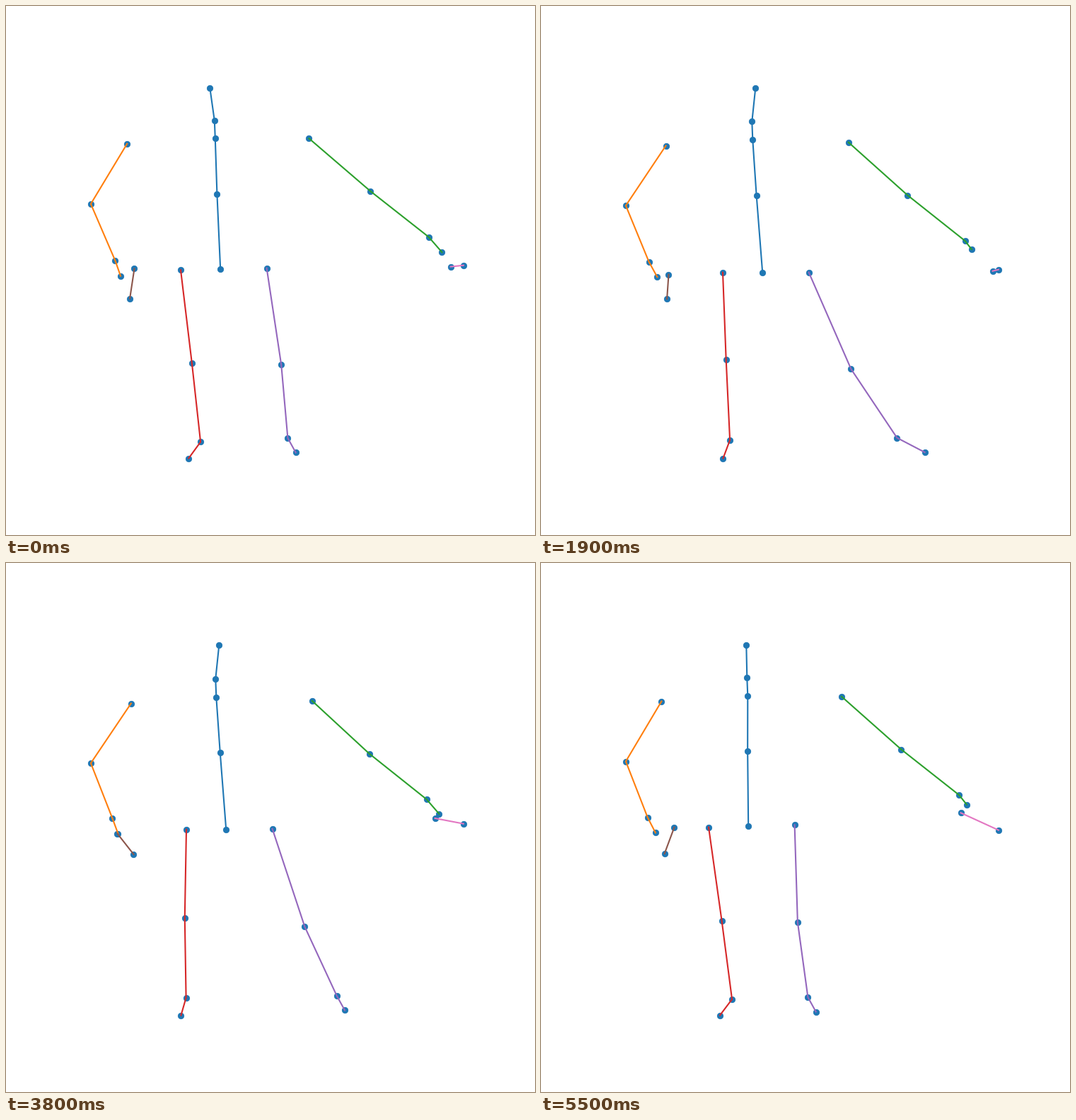
These frames come from a looping animation (748 by 748 pixels, 5.6 s). A matplotlib script:

```python
import numpy as np
import matplotlib.pyplot as plt
from matplotlib.animation import FuncAnimation

SIZE, DPI = 748, 100
FRAMES, STEP = 56, 100

# Body motions at a few key times; every joint follows a mix of them.
TIMES = np.array([0, 13, 19, 27, 38, 48, 55])
MOTIONS = dict(
    sag=[0, 4.5, 5.5, 6.5, 7.5, 6.5, 1.5],     # shoulders drop
    sway=[0, 1, 10, 8, 8, -5, -10],            # hips move sideways
    shift=[0, 0, 3.5, -0.5, 1.5, 2.5, -3.5],   # chest moves sideways
    nod=[0, 11, 11.5, 10.5, 11.5, 13.5, 5.5],  # head tilts
    stride=[0, 0.78, 1, 0.93, 0.66, -0.2, -0.2],
    drift=[0, -7, -8, -17, -20.5, -14, -5],    # left foot slides
    curl=[0, 0, -9.5, -11, -1, -11, -8],       # right wrist bends
    reach=[0, 8, 10, -44, -22, -24, -35],      # right finger
    flick=[0, -4, -1, -25, -24, -45, 7],       # left finger
    tip=[0, 14, 6, 15, 2, 4, 11],
)
HEEL_LIFT, TOE_OUT = 0.68, 28


def joint(rest, **gains):
    """Rest place and gains are complex: x is real, y (down) imaginary."""
    return rest, gains


def arm_gains(shift, sag):
    return dict(shift=shift, sag=sag + 1j, sway=-0.15)


wrist = arm_gains(2, -0.65)
ankle = dict(stride=105, sag=0.4j, sway=-0.25j)
left_wrist = dict(sag=-0.8, sway=0.25, stride=1.5j)

LIMBS = [
    [  # spine
        joint(288.3 + 115.9j, shift=1, nod=1),
        joint(294.8 + 162j, shift=1, sag=0.25j),
        joint(295.8 + 187.3j, shift=1, sag=0.3j),
        joint(298.4 + 265.8j, shift=0.5, sway=0.45, sag=0.2j, stride=1j),
        joint(303.2 + 372.4j, sway=1, sag=0.33j, stride=2.5j),
    ],
    [  # left arm
        joint(171.2 + 194.8j, shift=0.5, sag=0.65 + 0.5j),
        joint(119.9 + 279.9j, sag=0.42j),
        joint(154.5 + 360.2j, **left_wrist),
        joint(162 + 381.7j, curl=-0.45, **left_wrist),
    ],
    [  # right arm
        joint(428.5 + 187.3j, **arm_gains(1.6, 0.4)),
        joint(515.5 + 262j, **arm_gains(2, -0.5)),
        joint(597.7 + 326.6j, **wrist),
        joint(616.4 + 348.1j, curl=1 + 1j, **wrist),
    ],
    [  # left leg
        joint(247 + 373.3j, sway=1, sag=0.35j, stride=1.5j),
        joint(262.9 + 505.2j, drift=0.65, sway=0.4, stride=-5j),
        joint(275.1 + 616.4j, drift=1, stride=-2.5j),
        joint(258.3 + 639.5j, drift=0.9, sag=0.8, sway=0.2),
    ],
    [  # right leg
        joint(368.6 + 370.6j, sway=1, sag=0.35j, stride=4j),
        joint(389.2 + 507j, stride=33 + 2j, sway=1.9, sag=-0.5 + 0.8j),
        joint(398.4 + 610.9j, **ankle),
        joint(409.7 + 631.4j, toes=TOE_OUT, **ankle),
    ],
    [  # left finger
        joint(181.5 + 371.4j, flick=1, sag=1.5j),
        joint(175.1 + 413.5j, sway=0.4, reach=-0.1 + 0.07j),
    ],
    [  # right finger
        joint(628.6 + 368.6j, reach=1 + 0.45j, sag=0.3j),
        joint(646.9 + 366.7j, tip=1j),
    ],
]


def ease(keys):
    """All frames of one motion, smooth and without overshoot."""
    keys = np.array(keys, float)
    gap = np.diff(TIMES)
    rate = np.diff(keys) / gap
    a, b = rate[:-1], rate[1:]
    same = a * b > 0
    inner = np.where(same, 2 * a * b / np.where(same, a + b, 1), 0)
    slope = np.concatenate([rate[:1], inner, rate[-1:]])

    frames = np.arange(FRAMES)
    k = np.searchsorted(TIMES[1:-1], frames, side="right")
    t = (frames - TIMES[k]) / gap[k]
    blend = t * t * (3 - 2 * t)
    bend = t * (1 - t) * gap[k] * ((1 - t) * slope[k] - t * slope[k + 1])
    return keys[k] * (1 - blend) + keys[k + 1] * blend + bend


motion = {name: ease(keys) for name, keys in MOTIONS.items()}
motion["toes"] = np.clip((motion["stride"] - HEEL_LIFT) * 10, 0, 1)


def place(limb, frame):
    z = np.array([rest + sum(g * motion[name][frame]
                             for name, g in gains.items())
                  for rest, gains in limb])
    return np.column_stack([z.real, z.imag])


fig = plt.figure(figsize=(SIZE / DPI, SIZE / DPI), dpi=DPI, facecolor="white")
ax = fig.add_axes([0, 0, 1, 1])
ax.set_xlim(0, SIZE)
ax.set_ylim(SIZE, 0)
ax.axis("off")

dots = ax.scatter([], [], s=36, color="C0", linewidths=0.6)
lines = [ax.plot([], [], color=f"C{i}", lw=1.5)[0] for i in range(len(LIMBS))]


def draw(frame):
    poses = [place(limb, frame) for limb in LIMBS]
    for line, pose in zip(lines, poses):
        line.set_data(pose[:, 0], pose[:, 1])
    dots.set_offsets(np.vstack(poses))
    return [dots, *lines]


anim = FuncAnimation(fig, draw, frames=FRAMES, interval=STEP,
                     repeat=True, repeat_delay=0)
plt.show()
```
